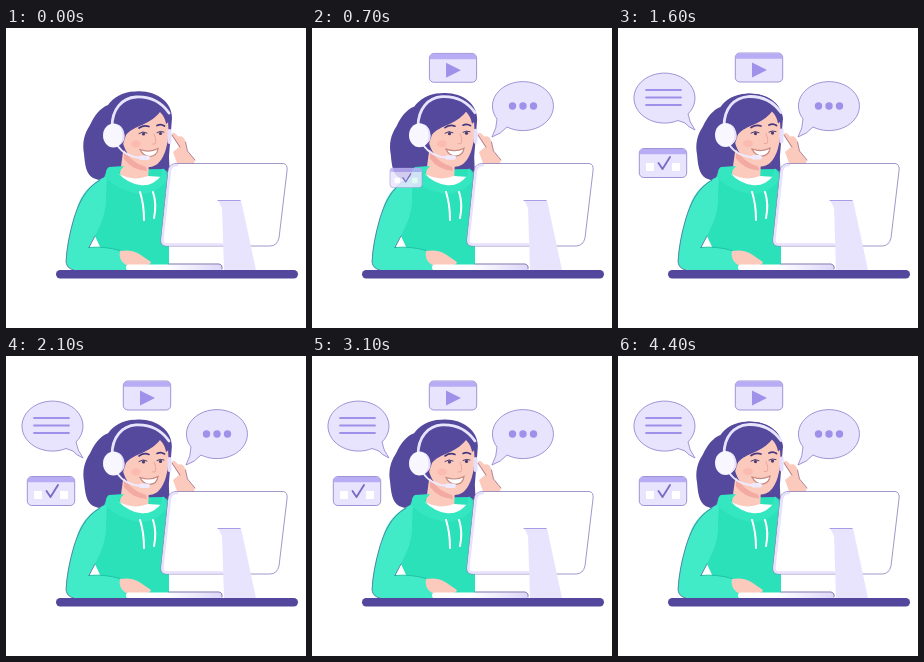
Animation, 300 px wide and 300 px high, one loop 4500 ms. Source, as an HTML page:

```html
<!DOCTYPE html>
<html lang="en">
<head>
<meta charset="utf-8">
<title>Support agent</title>
<style>
html, body { margin: 0; width: 100%; height: 100%; overflow: hidden; background: #fff; }
svg { display: block; width: 100vw; height: 100vh; }
.line { fill: none; stroke-linecap: round; stroke-linejoin: round; }
.card { fill: #e9e4fe; stroke: #8b7bcb; stroke-width: .8; stroke-linejoin: round; }
.mark { fill: #9f90ea; }
.hair { fill: #54499d; }
.skin { fill: #fccabd; }
.green { fill: #2ae1ba; }
.sleeve { fill: #41ebc8; }
</style>
</head>
<body>
<svg viewBox="0 0 300 300">
  <defs>
    <linearGradient id="keys"><stop offset=".4" stop-color="#fff"/><stop offset="1" stop-color="#ddd6fb"/></linearGradient>
    <g id="window">
      <rect class="card" x="-23.7" y="-14.5" width="47.4" height="29" rx="4.500"/>
      <path d="M-23.3-8.7V-10.500Q-23-14.1-19.500-14.1H19.500Q23-14.1 23.3-10.500V-8.7Z" fill="#b8adf5"/>
    </g>
  </defs>

  <!-- hair behind the head -->
  <path id="hair" class="hair" d="M130 63.500C117 63 107 70 102 77C94 80 88 88 84 97C78 106 76 115 78 126C79 137 80 146 87 150Q93 153 102 152H161C165 146 163 137 163 128L166 90C166 74 150 62 130 63.500Z"/>

  <!-- raised hand -->
  <path class="skin" d="M165.500 107Q167 102 172 108.500Q178 107 179.500 114L181.500 123L189 132L187 138H172L167 124L173 119Z"/>
  <path class="line" d="M166 107L174 119M179.500 114L181.500 123L189 132" stroke="#8c5b82" stroke-width=".7"/>

  <!-- body -->
  <path class="green" d="M101 142L158 141Q166 146 164 162V238H95V221L89 208L92 165Z"/>
  <path class="sleeve" d="M101 148C84 155 75 166 70 183C63 204 60 222 60 234Q61 242 70 242H123L114 222.500Q99 218 83 219.500L89 208C95 196 101 184 100 166Z"/>
  <path class="line" d="M83 219.500Q99 218 114 222.500" stroke="#20c3a4" stroke-width="1"/>
  <path class="line" d="M94 152C78 161 72 178 68 190Q61 214 60 234Q61 241 68 242M83 219.500L89 208" stroke="#4b5c98" stroke-width=".7"/>
  <path class="skin" d="M117 124L143 132L142 153Q125 157 114 146Z"/>
  <path d="M111 145Q127 154 142 148L157 149Q146 162 132 159Q118 155 111 145Z" fill="#fff"/>
  <path d="M103 139Q99 141 100 150Q113 163 134 166Q151 166 162 151L157 140L155 148Q146 159 134 157Q121 155 112 145L118 138Z" fill="#35e7c1"/>
  <path class="line" d="M134 164Q138 176 138 192M147 164Q151 176 148 190" stroke="#fff" stroke-width="2"/>

  <!-- head and headset -->
  <g id="head">
    <path class="skin" d="M118 91L158 79Q164 93 162 110C160 128 153 139 143 139C130 138 119 127 116 111Z"/>
    <path d="M118 122Q126 135 140 139L141 143Q126 142 118 131Z" fill="#f3aaa2"/>
    <path class="hair" d="M103 93C105 75 119 66 132 66C150 66 163 77 165 92L160 96Q159 89 154 84C143 98 128 97 120 107L116 119L106 117Z"/>
    <path class="line" d="M133 100Q138 96.500 143 98.500M151 97.500Q155 95.500 158.500 98" stroke="#43377e" stroke-width="1.700"/>
    <path class="line" d="M133 105.500Q137 102.500 141 105M151 104.500Q154 102.500 158 104" stroke="#463b70" stroke-width="1"/>
    <circle cx="137.500" cy="106" r="1.600" fill="#463b70"/>
    <circle cx="154.500" cy="105.500" r="1.600" fill="#463b70"/>
    <path class="line" d="M148 106Q151 113 149 116H146" stroke="#eda79d" stroke-width="1"/>
    <ellipse cx="130" cy="116" rx="5" ry="3.500" fill="#fbb0a8" opacity=".6"/>
    <path d="M134 121.500Q144 125 152 120.500Q151 128 144 128.500Q137 128 134 121.500Z" fill="#fff" stroke="#c68982" stroke-width="1.200"/>
    <path class="line" d="M106 99C106 81 116 70 130 69Q151 68 163 85" stroke="#e9e4fe" stroke-width="2.800"/>
    <path class="line" d="M111 117Q119 129 136 130" stroke="#eeeaff" stroke-width="1.800"/>
    <rect x="133" y="127.500" width="11" height="4.500" rx="2.200" fill="#eeeaff"/>
    <ellipse cx="107.500" cy="107.500" rx="10.500" ry="12" fill="#f8f6ff"/>
    <path d="M110 96A9 12 0 0 1 113 117Q121 113 118 104Q116 97 110 96Z" fill="#e5defc"/>
    <rect x="161.500" y="101" width="4" height="15" rx="2" fill="#e5defc"/>
  </g>

  <!-- desk and computer -->
  <path class="skin" d="M114 223Q126 221 134 226.500L145 234Q144 238 137 237H120Q112 232 114 223Z"/>
  <path d="M163 218H217L216 239H163Z" fill="#fff"/>
  <rect x="120" y="236.500" width="96" height="6" rx="3" fill="url(#keys)"/>
  <path class="line" d="M163 236H213Q217 237 216 241" stroke="#5f5298" stroke-width=".8"/>
  <path d="M170 135.500H277Q282 136 281 143L273 210Q271 218 264 218H160Q154 218 155 211L162 143Q163 136 170 135.500Z" fill="#fff" stroke="#8c7db8" stroke-width=".8"/>
  <path class="line" d="M171 137Q165 137 164 143L156.500 211Q156 216.500 161 216.500H216" stroke="#e7e1fd" stroke-width="2.400"/>
  <path d="M212 172H235L250 242H218L216 180Z" fill="#e9e4fe"/>
  <path class="line" d="M212 172.500H234" stroke="#a99de8" stroke-width="1"/>
  <rect x="50" y="242" width="242" height="8.500" rx="4.200" fill="#52479c"/>

  <g id="chat">
    <path class="card" d="M-26 13A30.500 24.500 0 1 1-16 21Q-22 28-31 31Q-26 22-26 13Z"/>
    <g class="mark"><circle cx="-10.500" r="3.700"/><circle r="3.700"/><circle cx="10.500" r="3.700"/></g>
  </g>
  <g id="video">
    <use href="#window"/>
    <path class="mark" d="M-7-5L8 2.500L-7 10Z"/>
  </g>
  <g id="tasks">
    <use href="#window"/>
    <path d="M-17 0h8v8h-8ZM9 0h8v8h-8Z" fill="#fff"/>
    <path class="line" d="M-4.500 0L-.5 6L7-6" stroke="#7a6bc6" stroke-width="1.900"/>
  </g>
  <g id="note">
    <path class="card" d="M24 16A30.500 25 0 1 0 14 22.500L21 25Q24 29 31 32Q25 24 24 16Z"/>
    <path class="line" d="M-18-8H17M-18-.5H17M-18 7H17" stroke="#9f90ea" stroke-width="1.800"/>
  </g>
</svg>
<script>
const LOOP = 4500, POP = 500;
const get = id => document.getElementById(id);
const mix = (a, b, p) => a + (b - a) * p;

// Each card grows out of the agent: start time, start point, resting point.
const cards = [
  ["chat", 80, 165, 115, 211, 78],
  ["video", 230, 141, 75, 141, 39.5],
  ["tasks", 500, 121, 158, 45, 135],
  ["note", 900, 112, 115, 46, 70]
].map(([id, start, ...path]) => [get(id), start, ...path]);
const hair = get("hair"), head = get("head");

function draw(now) {
  const t = now % LOOP;
  for (const [el, start, x0, y0, x1, y1] of cards) {
    const u = Math.min(1, Math.max(0, (t - start) / POP));
    const p = u * u * (3 - 2 * u);
    el.setAttribute("transform",
      `translate(${mix(x0, x1, p)} ${mix(y0, y1, p)}) scale(${mix(.5, 1, p)})`);
    el.setAttribute("opacity", Math.min(1, 2.4 * p));
  }
  const sway = (1 - Math.cos(t / 1000 * 2 * Math.PI)) / 2;
  hair.setAttribute("transform", `translate(120 155) scale(${1 - .028 * sway}) translate(-120 -155)`);
  head.setAttribute("transform", `translate(0 ${-.5 * sway})`);
}

const begin = performance.now();
function tick() {
  draw(performance.now() - begin);
  requestAnimationFrame(tick);
}
tick();
</script>
</body>
</html>
```
